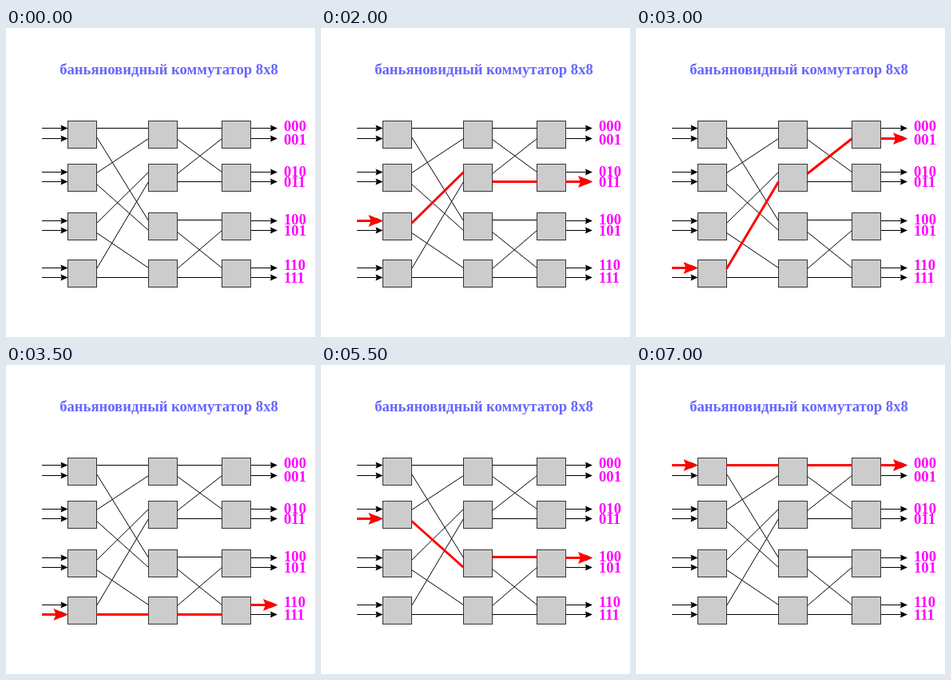
An HTML page for the animation above (7500 ms loop, 387 px wide and 387 px high).

```html
<!DOCTYPE html>
<html lang="ru">
<head>
<meta charset="utf-8">
<style>
  html, body { margin: 0; width: 100%; height: 100%; overflow: hidden; background: #fff; }
  svg { display: block; }
  text { font: bold 14pt "Liberation Serif", "Times New Roman", serif; }
  .title { fill: #66f; text-anchor: middle; }
  .label { fill: #f0f; }
  .box { fill: #ccc; stroke: #333; }
  .wire { stroke: #000; }
  .head { fill: #000; }
  .hot .wire { stroke: #f00; stroke-width: 3; }
  .hot .head { fill: #f00; }
</style>
</head>
<body>
<svg width="387" height="387" viewBox="0 0 387 387">
  <text class="title" x="204" y="58">баньяновидный коммутатор 8x8</text>
  <g id="net"></g>
  <g id="route" class="hot"></g>
</svg>
<script>
const STEP = 500;
const portY = [125.5, 138.5, 180.5, 192.5, 241.5, 253.5, 300.5, 312.5];
const labelY = [129, 146, 186, 199, 246, 260, 303, 319];
const boxX = [77.5, 178.5, 270.5];
const boxY = [116.5, 170.5, 231.5, 290.5];

// Small shifts of the wire starts, per output port of the first two stages
const shift = [[0, -2, 1, 3, 3, 3, 1, 0], [0, 1, 2, 0, -1, 2, 1, 0]];

// [input, output] for each step; null leaves the network idle
const routes = [
  null, [0, 6], [2, 1], [3, 4], [4, 3], [5, 5], [6, 1], [7, 6],
  [7, 1], [5, 7], [4, 5], [3, 4], [2, 2], [1, 4], [0, 0]
];

const line = (x1, y1, x2, y2) =>
  `<line class="wire" x1="${x1}" y1="${y1}" x2="${x2}" y2="${y2}"/>`;

function arrow(x1, x2, y, hot) {
  const [len, half, notch] = hot ? [18, 7.5, 3] : [9, 4, 1];
  return line(x1, y, x2 - len + notch, y) +
    `<path class="head" d="M${x2} ${y}l${-len} ${-half}l${notch} ${half}l${-notch} ${half}z"/>`;
}

const input = (i, hot) => arrow(45, 77.5, portY[i], hot);
const output = (i, hot) => arrow(306.5, 340, portY[i], hot);

// Switch reached from an output port of the given stage
function next(stage, port) {
  const box = port >> 1, bit = port & 1;
  return stage ? { box: (box & 2) + bit, entry: box & 1 }
               : { box: bit * 2 + (box >> 1), entry: box & 1 };
}

function link(stage, port) {
  const { box, entry } = next(stage, port);
  const y1 = portY[port] + shift[stage][port];
  const end = box * 2 + entry;
  const y2 = end === port && stage ? y1 : portY[end];
  return line(boxX[stage] + 36, y1, boxX[stage + 1], y2);
}

function path([from, to]) {
  const a = (from & 6) + (to >> 2);
  const b = next(0, a).box * 2 + (to >> 1 & 1);
  return input(from, true) + link(0, a) + link(1, b) + output(to, true);
}

let net = "";
for (let i = 0; i < 8; i++) {
  net += input(i) + link(0, i) + link(1, i) + output(i) +
    `<text class="label" x="348" y="${labelY[i]}">${i.toString(2).padStart(3, "0")}</text>`;
}
for (const x of boxX)
  for (const y of boxY)
    net += `<rect class="box" x="${x}" y="${y}" width="36" height="34"/>`;
document.getElementById("net").innerHTML = net;

const route = document.getElementById("route");
const start = performance.now();
let shown = -1;

function draw() {
  const step = Math.floor((performance.now() - start) / STEP) % routes.length;
  if (step !== shown) {
    shown = step;
    route.innerHTML = routes[step] ? path(routes[step]) : "";
  }
  requestAnimationFrame(draw);
}
draw();
</script>
</body>
</html>
```
